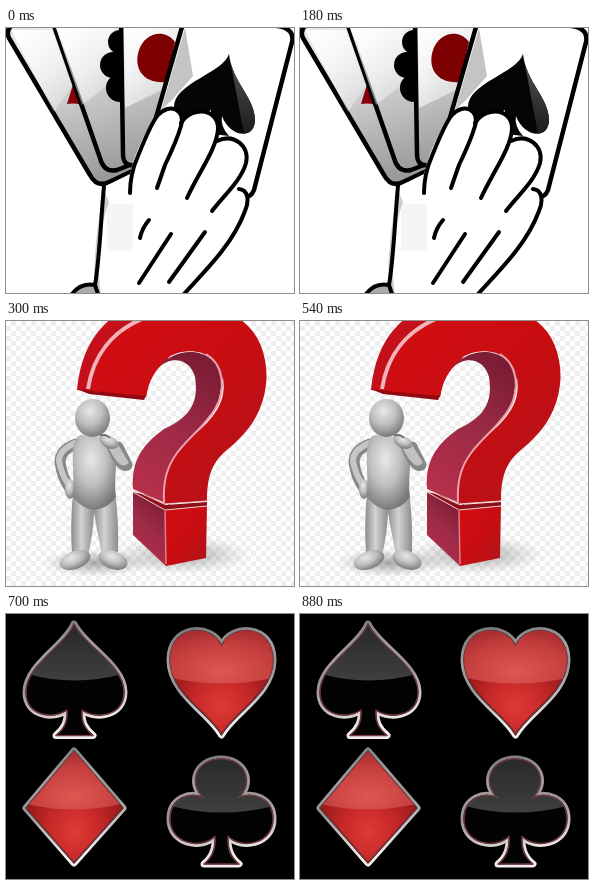
Recreate the animation shown at these times as an HTML page. Size 288 px wide and 265 px high, loop 1 s.

```html
<!DOCTYPE html>
<html lang="en">
<head>
<meta charset="utf-8">
<title>Cards, question, suits</title>
<style>
  html, body { margin: 0; width: 100%; height: 100%; overflow: hidden; background: #fff; }
  svg { position: absolute; inset: 0; width: 100%; height: 100%; display: block; }
  .scene { visibility: hidden; animation: 1s step-end infinite; }
  #hand { animation-name: first; }
  #question { animation-name: second; }
  #suits { animation-name: third; }
  @keyframes first { 0% { visibility: visible } 30%, 100% { visibility: hidden } }
  @keyframes second { 0% { visibility: hidden } 30% { visibility: visible } 70%, 100% { visibility: hidden } }
  @keyframes third { 0% { visibility: hidden } 70%, 100% { visibility: visible } }
  .ink { fill: none; stroke: #000; stroke-width: 4; stroke-linecap: round; stroke-linejoin: round; }
  .card { stroke: #000; stroke-width: 4.5; stroke-linejoin: round; }
  .rim { fill: none; stroke: url(#silver); stroke-width: 7; stroke-linejoin: round; }
  .edge { stroke: #3b2022; stroke-width: 1.5; stroke-linejoin: round; }
</style>
</head>
<body>
<svg viewBox="0 0 288 265" preserveAspectRatio="none">
  <defs>
    <linearGradient id="shade" gradientUnits="userSpaceOnUse" x1="50" y1="15" x2="92" y2="150">
      <stop offset="0" stop-color="#e8e8e8"/><stop offset=".4" stop-color="#ccc"/><stop offset="1" stop-color="#9a9a9a"/>
    </linearGradient>
    <linearGradient id="sheen" x1="0" y1="0" x2="1" y2="1">
      <stop offset="0" stop-color="#fff"/><stop offset="1" stop-color="#fff" stop-opacity=".2"/>
    </linearGradient>
    <linearGradient id="spadeSheen" x1="0" y1="0" x2="0" y2="1">
      <stop offset="0" stop-color="#555"/><stop offset="1" stop-color="#1c1c1c"/>
    </linearGradient>

    <pattern id="checks" width="10" height="10" patternUnits="userSpaceOnUse">
      <path fill="#fff" d="M0 0h10v10H0z"/><path fill="#eee" d="M5 0h5v5H5zM0 5h5v5H0z"/>
    </pattern>
    <linearGradient id="red" x1="0" y1="0" x2="1" y2="1">
      <stop offset="0" stop-color="#d30d12"/><stop offset=".5" stop-color="#c80d11"/><stop offset="1" stop-color="#b0141b"/>
    </linearGradient>
    <linearGradient id="side" x1=".6" y1="0" x2=".2" y2="1">
      <stop offset="0" stop-color="#7d1d35"/><stop offset=".45" stop-color="#9c2a46"/><stop offset="1" stop-color="#b9304a"/>
    </linearGradient>
    <radialGradient id="clay" cx=".42" cy=".32" r=".7">
      <stop offset="0" stop-color="#e8e8e8"/><stop offset=".5" stop-color="#bfbfbf"/><stop offset="1" stop-color="#777"/>
    </radialGradient>
    <linearGradient id="limb">
      <stop offset="0" stop-color="#8c8c8c"/><stop offset=".45" stop-color="#d2d2d2"/><stop offset="1" stop-color="#8c8c8c"/>
    </linearGradient>
    <radialGradient id="floor">
      <stop offset="0" stop-color="#555" stop-opacity=".5"/><stop offset="1" stop-color="#777" stop-opacity="0"/>
    </radialGradient>

    <linearGradient id="silver" x1="0" y1="0" x2=".2" y2="1">
      <stop offset="0" stop-color="#777"/><stop offset=".3" stop-color="#a5a0a0"/>
      <stop offset=".55" stop-color="#9a9293"/><stop offset="1" stop-color="#f5eeee"/>
    </linearGradient>
    <radialGradient id="ruby" cx=".5" cy=".72" r=".5">
      <stop offset="0" stop-color="#df3a35"/><stop offset=".55" stop-color="#c52828"/><stop offset="1" stop-color="#a01a1c"/>
    </radialGradient>
    <radialGradient id="rubyGloss" cx=".5" cy=".8" r=".75">
      <stop offset="0" stop-color="#df5752"/><stop offset=".6" stop-color="#c43e3e"/><stop offset="1" stop-color="#a2282b"/>
    </radialGradient>
    <linearGradient id="jetGloss" x1="0" y1="0" x2="0" y2="1">
      <stop offset="0" stop-color="#262626"/><stop offset="1" stop-color="#3f3f3f"/>
    </linearGradient>
    <path id="spade" d="M68 10C77 31 118 51 118 78C118 102 90 106 76 96C75 108 79 115 87 121.500H50C58 115 62 108 61 96C47 106 20 102 20 78C20 51 60 31 68 10Z"/>
    <path id="heart" d="M215.500 121C204 99 164 80 164 46C164 10 206 9 215.500 32C225 9 267 10 267 46C267 80 227 99 215.500 121Z"/>
    <path id="diamond" d="M68 137L117 194L68 249L20 194Z"/>
    <path id="club" d="M198 250C206 244 210 236 209 222C196 236 164 230 164 205C164 184 184 177 198 184C181 169 191 145 215 145C239 145 249 169 232 184C246 177 267 184 267 205C267 230 235 236 222 222C221 236 225 244 233 250Z"/>
    <clipPath id="spadeClip"><use href="#spade"/></clipPath>
    <clipPath id="heartClip"><use href="#heart"/></clipPath>
    <clipPath id="diamondClip"><use href="#diamond"/></clipPath>
    <clipPath id="clubClip"><use href="#club"/></clipPath>
  </defs>

  <g id="hand" class="scene">
    <path fill="#fff" d="M0 0h288v265H0z"/>
    <!-- fanned cards -->
    <path class="card" fill="url(#shade)" d="M8 -4Q-1 1 3 10L84 147Q91 160 103 154L135 139V-8Z"/>
    <path fill="url(#sheen)" d="M5 2H46L66 58L48 84Z"/>
    <path fill="#85000a" d="M73 37L61 76Q72 74 84 80Z"/>
    <path class="card" fill="url(#shade)" d="M46 -8L94 130Q98 145 111 142L142 130V-8Z"/>
    <path fill="url(#sheen)" d="M50 0H108L104 55L76 77Z"/>
    <circle cx="114" cy="14" r="12"/><circle cx="107" cy="37" r="13"/><circle cx="114" cy="60" r="14"/>
    <path class="card" fill="url(#shade)" d="M115 -8L117 126Q117 139 129 137L165 125L185 -8Z"/>
    <path fill="url(#sheen)" d="M118 0H178L160 60L119 80Z"/>
    <path fill="#7d0003" d="M160 54C137 56 127 40 133 22C139 5 158 0 169 14Z"/>
    <path class="card" fill="#fff" d="M178 -8L149 93L160 147L233 168Q244 172 248 162L286 14Q289 1 272 -2Z"/>
    <path fill="#c4c4c4" d="M179 0L187 48L166 72L155 82Z"/>
    <path fill="#050505" d="M223 26C217 45 168 55 168 79C170 94 192 91 205 82Q205 96 190 104L223 108Q214 98 216 88C224 110 249 112 249 92C249 70 226 54 223 26Z"/>
    <path fill="url(#spadeSheen)" d="M223 26C226 54 249 70 249 92Q248 104 238 106Z"/>
    <!-- gloved hand -->
    <path fill="#fff" d="M98 159L124 146C130 121 141 100 152 87C163 75 178 82 176 96C190 77 214 83 212 104L210 113C229 104 244 118 240 136L233 160C242 162 243 173 239 182C228 213 206 236 178 265H82C91 240 89 194 98 159Z"/>
    <path fill="#f5f5f5" d="M101 176h26v47h-26z"/>
    <path fill="#ccc" d="M98 162Q88 210 88 256L91 265H95C91 238 92 204 103 174Z"/>
    <path fill="#aaa" d="M89 257Q76 253 67 265H91Z"/>
    <g class="ink">
      <path d="M98 158C95 188 94 228 89 257Q75 254 66 266M89 257L92 266"/>
      <path d="M124 165Q124 146 132 128C140 108 146 94 152 87C164 74 180 82 175 98Q171 112 159 137L151 160"/>
      <path d="M175 95C188 76 213 82 212 101C211 120 193 144 181 170"/>
      <path d="M211 113C228 105 244 118 240 135C235 153 218 167 206 183"/>
      <path d="M233 161C243 162 243 174 239 183C228 213 206 236 178 266"/>
      <path d="M143 192Q136 200 134 210M165 206L133 255M199 204L163 254"/>
    </g>
  </g>

  <g id="question" class="scene">
    <path fill="url(#checks)" d="M0 0h288v265H0z"/>
    <ellipse cx="90" cy="242" rx="55" ry="14" fill="url(#floor)"/>
    <ellipse cx="176" cy="234" rx="68" ry="19" fill="url(#floor)"/>
    <!-- question mark -->
    <path fill="#c4101a" d="M71 69C75 30 90 8 110 -6H195L160 40Q144 52 140 76Z"/>
    <path fill="url(#side)" d="M152 47C170 24 207 25 217 55L212 84L182 122L164 184L127 168C125 140 136 124 158 108C184 96 193 82 189 56C184 38 166 34 152 47Z"/>
    <path fill="url(#red)" d="M87 70C91 30 113 4 148 -8H222C248 2 261 27 260.500 57C259 90 242 112 222 128C206 141 201 155 201 180L157 183C156 149 169 132 186 116C207 98 221 82 217 57C211 26 174 23 153 43Q143 54 140 76Z"/>
    <path fill="#930711" d="M71 68L87 70L140 75L138 79L83 73Z"/>
    <path d="M82 68C87 35 106 10 138 -3" fill="none" stroke="#f3b3b8" stroke-width="4"/>
    <path d="M200 33C217 43 221 68 209 88C199 105 183 116 171 132C160 147 157 162 158 182" fill="none" stroke="#eba1ad" stroke-width="2"/>
    <path fill="url(#side)" d="M127 171L159 188L160 245L127 214Z"/>
    <path fill="url(#red)" d="M159 189L201 185L200 237L160 245Z"/>
    <path fill="#8e101a" d="M127 171L141 174L160 184L201 181V185L159 189Z"/>
    <path d="M128 169L158 183L201 180M127 171L159 189L201 185" fill="none" stroke="#ecc" stroke-width="1"/>
    <path d="M159 190L160 243" stroke="#e07b87" stroke-width="1.5"/>
    <!-- thinking figure -->
    <path fill="url(#limb)" d="M67 171Q64 205 66 233L82 234Q88 211 88 186Z"/>
    <path fill="url(#limb)" d="M87 186Q91 210 96 234L112 231Q113 200 109 170Z"/>
    <ellipse cx="69" cy="239" rx="16" ry="9" fill="url(#clay)" transform="rotate(-20 69 239)"/>
    <ellipse cx="107" cy="239" rx="15" ry="9" fill="url(#clay)" transform="rotate(20 107 239)"/>
    <path d="M70 123Q54 129 54 141Q56 156 63 166" fill="none" stroke="#888" stroke-width="11" stroke-linecap="round" stroke-linejoin="round"/>
    <path d="M69 122Q53 129 53 140Q55 152 62 163" fill="none" stroke="#c6c6c6" stroke-width="6" stroke-linecap="round"/>
    <ellipse cx="64" cy="168" rx="5" ry="10" fill="url(#clay)"/>
    <path fill="url(#clay)" d="M75 114C62 118 69 144 67 176Q76 188 88 189Q103 187 110 176C107 153 115 128 106 117Z"/>
    <path d="M106 125Q115 147 121 144L112 126" fill="none" stroke="#888" stroke-width="11" stroke-linecap="round" stroke-linejoin="round"/>
    <path d="M106 127Q115 144 119 141L110 126" fill="none" stroke="#c2c2c2" stroke-width="6" stroke-linecap="round"/>
    <ellipse cx="86.500" cy="97" rx="17.500" ry="19" fill="url(#clay)"/>
    <ellipse cx="103" cy="121" rx="10" ry="6" fill="url(#clay)" transform="rotate(25 103 121)"/>
    <path d="M94 115Q99 112 104 117" fill="none" stroke="#666" stroke-width="1.5"/>
  </g>

  <g id="suits" class="scene">
    <path d="M0 0h288v265H0z"/>
    <g class="rim"><use href="#spade"/><use href="#heart"/><use href="#diamond"/><use href="#club"/></g>
    <g class="edge">
      <use href="#spade" fill="#030303"/><use href="#heart" fill="url(#ruby)"/>
      <use href="#diamond" fill="url(#ruby)"/><use href="#club" fill="#030303"/>
    </g>
    <path clip-path="url(#spadeClip)" fill="url(#jetGloss)" d="M15 5H123V58Q68 75 15 58Z"/>
    <path clip-path="url(#heartClip)" fill="url(#rubyGloss)" d="M158 8H275V62Q216 77 158 62Z"/>
    <path clip-path="url(#diamondClip)" fill="url(#rubyGloss)" d="M12 130H124V188Q68 203 12 188Z"/>
    <path clip-path="url(#clubClip)" fill="url(#jetGloss)" d="M158 138H274V190Q216 207 158 190Z"/>
    <g fill="none" stroke="#8a4048" stroke-width=".8">
      <use href="#spade"/><use href="#heart"/><use href="#diamond"/><use href="#club"/>
    </g>
  </g>
</svg>
</body>
</html>
```
